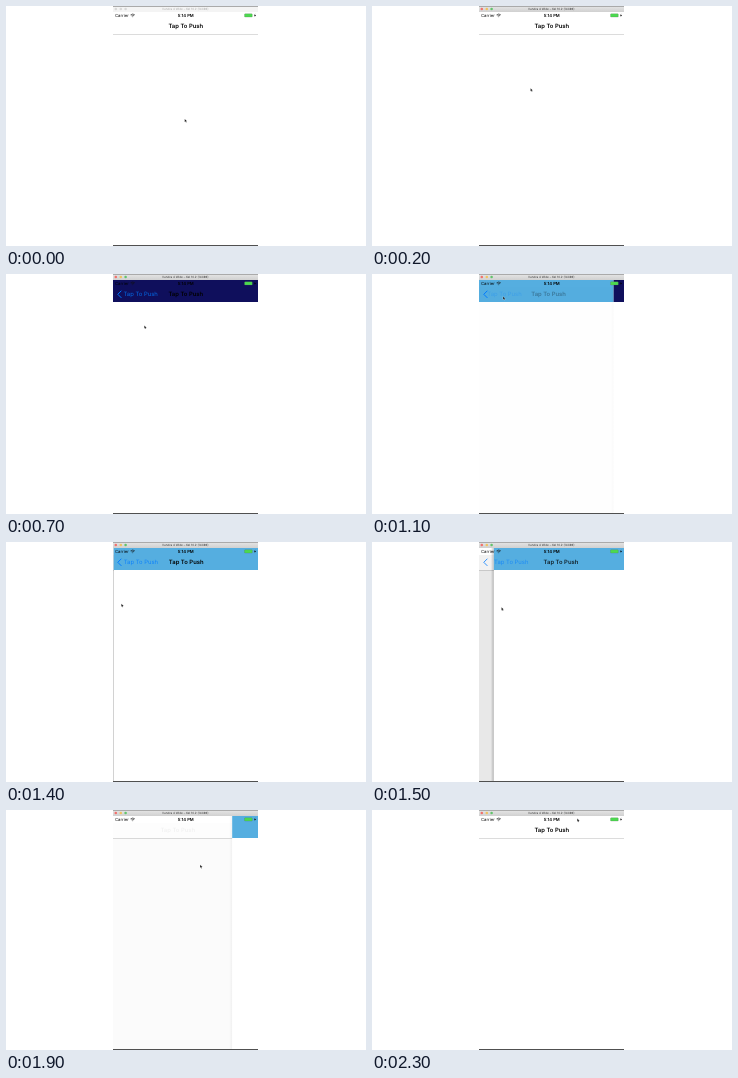
These frames come from a looping animation (360x240 px, 2400 ms). An HTML page:

```html
<!DOCTYPE html>
<html lang="en">
<head>
<meta charset="utf-8">
<title>Navigation bar colours</title>
<style>
  html, body { margin: 0; width: 100%; height: 100%; overflow: hidden; background: #fff; }
  svg { display: block; width: 360px; height: 240px; }
  text { font-family: Inter, "Open Sans", sans-serif; text-rendering: geometricPrecision; }
  .nav { font-size: 5.9px; }
  .bold { font-weight: 600; }
  .link { fill: #007aff; }
  .status { font-size: 4.2px; }
  .caption { font-size: 2.95px; }
</style>
</head>
<body>
<svg viewBox="0 0 360 240">
  <defs>
    <clipPath id="screen"><rect x="107" y="6" width="145" height="234"/></clipPath>
    <linearGradient id="edge">
      <stop offset="0" stop-color="#000" stop-opacity="0"/>
      <stop offset="1" stop-color="#000" stop-opacity=".25"/>
    </linearGradient>
    <linearGradient id="chrome" x2="0" y2="1">
      <stop offset="0" stop-color="#e6e6e6"/>
      <stop offset="1" stop-color="#d0d0d0"/>
    </linearGradient>
  </defs>

  <g clip-path="url(#screen)">
    <rect x="107" y="6" width="145" height="234" fill="#fff"/>
    <rect id="underBar" x="107" y="6" width="145" height="22"/>
    <rect id="hairline" x="107" y="28" width="145" height="1" fill="#dcdcdc"/>
    <g id="dim">
      <rect x="107" y="13" width="145" height="15" opacity=".06"/>
      <rect x="107" y="28" width="145" height="212" opacity=".1"/>
    </g>
    <g id="top">
      <rect id="shadow" x="104" y="6" width="3" height="234" fill="url(#edge)"/>
      <rect x="107" y="6" width="145" height="234" fill="#fff"/>
      <rect id="topBar" x="107" y="6" width="145" height="22"/>
    </g>

    <path id="chevron" d="M115.4 16.7 111.8 20.3 115.4 23.9" fill="none" stroke="#007aff" stroke-width="1"/>
    <text id="underBack" class="nav link" y="22.2">Tap To Push</text>
    <text id="back" class="nav link" y="22.2">Tap To Push</text>
    <text id="incoming" class="nav bold" y="22.2">Tap To Push</text>
    <text id="title" class="nav bold" y="22.2">Tap To Push</text>

    <text class="status" x="109" y="10.9">Carrier</text>
    <g fill="none" stroke="#111" stroke-width=".6">
      <path d="M124.5 8.9Q126.7 7.1 128.9 8.9M125.4 9.8Q126.7 8.7 128 9.8"/>
      <path d="M126.3 10.7H127.1"/>
    </g>
    <text class="status bold" x="179.7" y="10.9" text-anchor="middle">5:14 PM</text>
    <rect x="238.5" y="7.7" width="7.8" height="3.4" rx=".7" fill="#4cd94f" stroke="#555" stroke-opacity=".5" stroke-width=".4"/>
    <path d="M249.3 7.6 248 9.7H249L248.5 11.3 250 9.1H249Z"/>
  </g>

  <rect id="bar" x="107" y="0" width="145" height="6"/>
  <g id="lights">
    <circle cx="109.8" cy="3" r="1.3"/>
    <circle cx="114.8" cy="3" r="1.3"/>
    <circle cx="119.6" cy="3" r="1.3"/>
  </g>
  <text id="caption" class="caption" x="179.3" y="4.1" text-anchor="middle">Vundra 4 Wide – Kel 10.2 (14C89)</text>
  <rect x="107" y="0" width="145" height="1" fill="#aaa"/>
  <rect x="107" y="239" width="145" height="1" fill="#505050"/>
  <path id="cursor" d="M0 0V3.1L.8 2.4 1.3 3.6 1.9 3.3 1.4 2.2H2.4Z" stroke="#fff" stroke-width=".25"/>
</svg>

<script>
const LOOP = 2400, STEP = 100, LEFT = 107, WIDTH = 145;
const GRIP = 7.6;       // distance from the dragged edge to the pointer
const RELEASE = 1800;   // end of the drag
const barColors = ["#fff", "#55aee0", "#0f0f5c"];
const lightColors = ["#f2716c", "#f0c260", "#62c46c"];

const cursorStops = [
  { t: 0, x: 178.7, y: 113 },
  { t: 400, x: 138.3, y: 51.5 },
  { t: 700, x: 138.3, y: 51.5 },
  { t: 1100, x: 131, y: 22.5 },
  { t: 1425, x: 114, y: 65 },
  { t: RELEASE, x: 191.3, y: 66.4 },
  { t: LOOP, x: 208, y: -3 }
];

const $ = id => document.getElementById(id);
const set = (id, attrs) => {
  for (const key in attrs) $(id).setAttribute(key, attrs[key]);
};
const mix = (a, b, k) => a + (b - a) * k;
const clamp = v => Math.min(1, Math.max(0, v));
const fadeOut = p => clamp(1 - 2 * p);
const glide = (t, start, length) => 1 - (1 - clamp((t - start) / length)) ** 2.4;

function cursorAt(t) {
  const i = cursorStops.findIndex(stop => stop.t > t);
  const a = cursorStops[i - 1], b = cursorStops[i];
  const k = (t - a.t) / (b.t - a.t);
  return { x: mix(a.x, b.x, k), y: mix(a.y, b.y, k) };
}

const dragShare = t => clamp((cursorAt(t).x - GRIP - LEFT) / WIDTH);

// Level of the upper page and the share of it moved off to the right.
function pageAt(t) {
  if (t < 600) return [1, 1 - glide(t, 200, 300)];
  if (t < 900) return [2, 1 - glide(t, 500, 200)];
  if (t < 1200) return [2, glide(t, 900, 300)];
  if (t < 1400) return [1, 0];
  if (t < RELEASE) return [1, dragShare(t)];
  return [1, mix(dragShare(RELEASE), 1, glide(t, RELEASE, 300))];
}

function drawPages(level, p) {
  const root = level === 1;
  set("underBar", { fill: barColors[level - 1] });
  set("topBar", { fill: barColors[level] });
  set("hairline", { opacity: root ? 1 : 0 });
  set("dim", { opacity: 1 - p });
  set("shadow", { opacity: 1 - p });
  set("top", { transform: `translate(${WIDTH * p})`, visibility: p < 1 ? "visible" : "hidden" });

  // The back label travels to the centre and becomes the title below.
  const labelX = mix(117.5, 162.4, p);
  set("chevron", { opacity: root ? fadeOut(p) : 1 });
  set("back", { x: labelX, opacity: .85 * fadeOut(p) });
  set("incoming", { x: labelX, opacity: p ** 16 });
  set("title", { x: 162.4 + 90 * p, opacity: fadeOut(p) });
  set("underBack", { x: 117.5 - 30 * (1 - p), opacity: root ? 0 : .5 * p ** 8 });
}

function drawWindow(active) {
  set("bar", { fill: active ? "url(#chrome)" : "#f4f4f4" });
  set("caption", { fill: active ? "#333" : "#aaa" });
  [...$("lights").children].forEach((dot, i) =>
    dot.setAttribute("fill", active ? lightColors[i] : "#d8d8d8"));
}

function render(t) {
  const { x, y } = cursorAt(t);
  drawPages(...pageAt(t));
  drawWindow(t >= 200);
  set("cursor", { transform: `translate(${x} ${y})` });
}

const start = performance.now();
function tick() {
  const t = (performance.now() - start) % LOOP;
  render(Math.floor(t / STEP) * STEP);
  requestAnimationFrame(tick);
}
tick();
</script>
</body>
</html>
```
